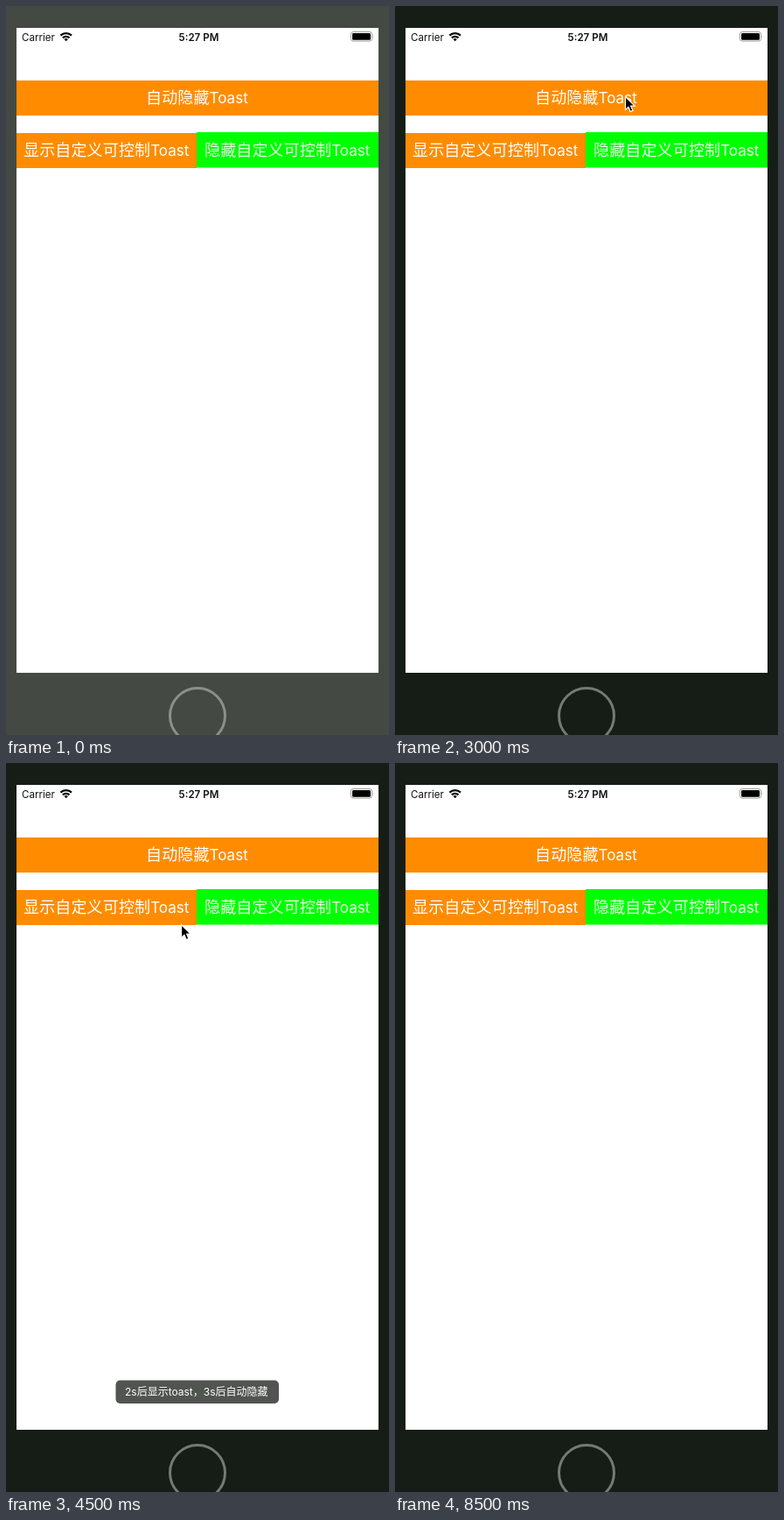
Animation, 438 px wide and 832 px high, one loop 8.9 s. Source, as an HTML page:

```html
<!DOCTYPE html>
<html lang="zh-CN">
<head>
<meta charset="utf-8">
<title>Toast demo</title>
<style>
  html, body { margin: 0; width: 100%; height: 100%; overflow: hidden; background: #161d16; }
  svg { display: block; width: 438px; height: 832px; }
  text { font-family: Inter, "Noto Sans CJK SC", "Noto Sans CJK", sans-serif; white-space: pre; }
  .label { font-size: 18px; fill: #fff; letter-spacing: .15px; }
  .label tspan { font-size: 17px; letter-spacing: 0; }
  .soft { fill: #e6ffe6; }
  .status { font-size: 11.6px; fill: #111; }

  .case, .ring, .toast, .cursor { animation: 8.9s linear infinite; }
  .case { animation-name: dim; animation-timing-function: step-end; }
  .ring { animation-name: ring; animation-timing-function: step-end; }
  .toast { animation-name: toast; }
  .cursor { animation-name: move, show; animation-timing-function: linear, step-end;
            animation-duration: 8.9s; animation-iteration-count: infinite; }

  @keyframes dim  { 0% { fill: #444a43; } 4.45%, 100% { fill: #161d16; } }
  @keyframes ring { 0% { stroke: #8c908a; } 4.45%, 100% { stroke: #757a73; } }
  @keyframes show {
    0% { visibility: hidden; }
    4.45% { visibility: visible; }
    56.7%, 100% { visibility: hidden; }
  }
  @keyframes move {
    0%, 4.494% { transform: translate(324px, 97px); }
    11.236%, 23.596% { transform: translate(304px, 101px); }
    32.584%, 33.708% { transform: translate(263px, 103px); }
    38.202%, 43.82% { transform: translate(256px, 103px); }
    50.562% { transform: translate(200px, 184px); animation-timing-function: ease-in; }
    56.18%, 100% { transform: translate(160px, 731px); }
  }
  @keyframes toast {
    0%, 39.326% { opacity: 0; }
    40.449% { opacity: .35; }
    41.573% { opacity: .6; }
    42.697% { opacity: .76; }
    44.944% { opacity: .91; }
    49.438%, 84.27% { opacity: 1; }
    85.393% { opacity: .84; }
    89.888% { opacity: .26; }
    94.382%, 100% { opacity: 0; }
  }
</style>
</head>
<body>
<svg viewBox="0 0 438 832">
  <rect class="case" width="438" height="832" fill="#444a43"/>
  <rect x="12" y="25" width="414" height="736" fill="#fff"/>
  <circle class="ring" cx="219" cy="810" r="31.5" fill="none" stroke="#8c908a" stroke-width="3"/>

  <!-- status bar -->
  <text class="status" x="18" y="39.5">Carrier</text>
  <g fill="none" stroke="#000" stroke-width="2.2">
    <path d="M62.4 33.6a9 9 0 0 1 12.6 0"/>
    <path d="M64.9 36.4a5.4 5.4 0 0 1 7.6 0"/>
  </g>
  <path d="M66.6 38a3 3 0 0 1 4.2 0l-2.1 2.2z"/>
  <text class="status" x="220.5" y="39.5" text-anchor="middle" font-weight="600">5:27 PM</text>
  <rect x="394.5" y="29.5" width="24" height="10.6" rx="2.6" fill="none" stroke="#9aa09a"/>
  <rect x="396" y="31" width="21" height="7.8" rx="1.4"/>
  <path d="M419.8 33.2q1.4 1.6 0 3.4z" fill="#9aa09a"/>

  <!-- buttons -->
  <rect x="12" y="85" width="414" height="40" fill="#ff8c00"/>
  <rect x="12" y="145" width="206" height="40" fill="#ff8c00"/>
  <rect x="218" y="144" width="208" height="40.5" fill="#0f0"/>
  <text class="label" x="160" y="111">自动隐藏<tspan>Toast</tspan></text>
  <text class="label" x="20" y="171">显示自定义可控制<tspan>Toast</tspan></text>
  <text class="label soft" x="227" y="171">隐藏自定义可控制<tspan>Toast</tspan></text>

  <g class="toast">
    <rect x="125.5" y="704.5" width="186.5" height="26.5" rx="5" fill="#50554f"/>
    <text x="136" y="722" font-size="12" fill="#fff">2s后显示toast，3s后自动隐藏</text>
  </g>

  <g class="cursor">
    <path d="M.5 .5V15.4L3.9 12.2 6.2 17.6 9 16.4 6.7 11.1H11.2z" stroke="#fff" stroke-width="1.2"/>
  </g>
</svg>
</body>
</html>
```
